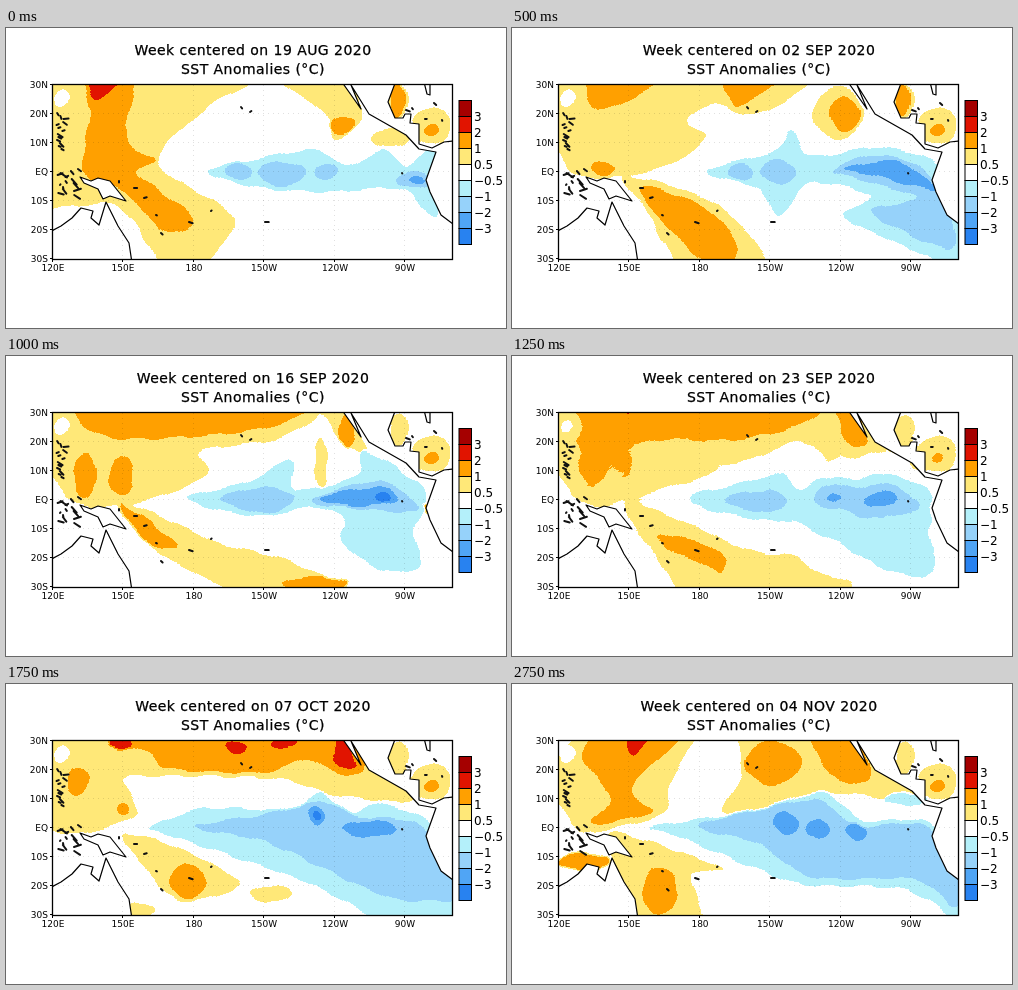
An HTML page with a canvas that plays this animation: 500x300 px, repeating every 3.75 s.

```html
<!DOCTYPE html>
<html lang="en">
<head>
<meta charset="utf-8">
<title>SST Anomalies</title>
<style>
html, body { margin: 0; width: 100%; height: 100%; overflow: hidden; background: #fff; }
canvas, svg { position: absolute; left: 0; top: 0; }
#map { left: 47px; top: 57px; }
text { font-family: "DejaVu Sans", sans-serif; font-size: 9px; }
.title { font-size: 14px; letter-spacing: .45px; text-anchor: middle; stroke: #000; stroke-width: .25px; }
.scale { font-size: 12px; }
.grid { stroke: #000; stroke-opacity: .12; stroke-dasharray: 1 4; }
.land { fill: #fff; stroke: #000; stroke-width: 1.2; stroke-linejoin: round; }
.isle { fill: none; stroke: #111; stroke-width: 2; stroke-linecap: round; }
</style>
</head>
<body>
<canvas id="map" width="399" height="174"></canvas>
<svg id="chart" width="500" height="300" viewBox="0 0 500 300">
  <defs><clipPath id="frame"><path d="M47 57H446V231H47Z"/></clipPath></defs>
  <text class="title" id="week" x="247" y="27"></text>
  <text class="title" x="247" y="46">SST Anomalies (°C)</text>
  <g clip-path="url(#frame)">
    <path class="land" d="M40 206L55 198 66 190 75 180 87 183 85 190 93 197 100 174 112 198 123 215 126 235H40Z"/>
    <path class="land" d="M74 149L85 153 92 150 104 153 120 173 104 168 97 171 92 161 78 155Z"/>
    <path class="land" d="M338 50V57L355 81 345 57 363 86 400 107 413 121 430 124 420 152 424 164 435 187 447 196V113L438 114 426 120 413 116V96L404 95 405 86 399 86 397 90 389 90 382 74 391 50Z"/>
    <path class="land" d="M417 50L421 66 424 67V50Z"/>
    <path class="isle" id="isles"/>
  </g>
</svg>
<script>
const LEFT = 47, TOP = 57, RIGHT = 446, BOTTOM = 231, STEP = 250, LOOP = 3750, WEEKS = 12;
const COLORS = ['#2882f0', '#50a5f5', '#96d2fa', '#b4f0fa', '#ffffff', '#ffe878', '#ffa000', '#e11400', '#a50000'];
const LEVELS = { deep: -4, blue: -3, sky: -2, cyan: -1, white: 0, yellow: 1, orange: 2, red: 3 };

// Outlines are smooth closed curves; four numbers mean an ellipse. Painted in order.
const CARIBBEAN = { yellow: '425 98 20 18 / 393 74 9 17', orange: '426 103 8 6' };
const fields = {};

fields[0] = {
  yellow: '66 57 248 57 203 78 152 135 228 190 188 231 160 231 112 178 47 175 47 86 / 266 57 340 57 355 92 330 111 318 84 / 384 110 20 9',
  orange: '80 57 128 57 120 110 149 133 131 145 188 190 160 204 116 162 78 145 84 85 / 336 97 13 9 / 391 73 8 19',
  red: '82 57 121 57 92 73',
  cyan: '200 143 240 133 308 122 342 138 378 122 400 138 428 122 430 190 395 161 320 164 248 159',
  sky: '233 143 14 8 / 276 146 24 12 / 321 143 12 8 / 408 152 17 8',
  blue: '411 153 7 4'
};
fields[2] = {
  yellow: '68 57 296 57 246 86 200 76 174 92 193 109 150 140 65 147 47 84 / 110 149 160 158 215 184 258 231 175 231 132 178 / 326 85 25 26',
  orange: '78 57 160 57 88 82 / 213 57 273 57 225 78 / 128 158 190 178 225 215 205 231 148 191 / 333 86 15 17 / 390 72 8 18 / 91 140 11 7',
  cyan: '193 143 262 123 280 103 300 128 368 119 428 138 446 198 446 231 385 215 330 187 360 168 300 155 267 187 245 160',
  sky: '229 144 13 8 / 266 144 17 12 / 322 142 360 127 410 140 440 190 435 221 358 184 405 170 335 148',
  blue: '332 141 385 133 424 162 360 147'
};
fields[4] = {
  yellow: '47 57 305 57 276 81 196 95 200 121 125 148 62 141 / 110 145 165 165 215 188 280 204 356 231 255 231 155 198 / 312 57 340 57 360 92 403 120 340 89 / 315 108 6 26',
  orange: '78 57 302 57 255 73 106 82 / 79 120 11 23 / 115 120 12 20 / 114 148 147 168 172 192 140 186 / 341 74 8 17 / 310 228 33 7',
  cyan: '180 143 240 126 285 104 290 134 350 120 360 95 420 136 408 175 415 210 375 214 335 185 340 165 310 151 250 160',
  sky: '213 143 256 131 288 140 262 158 / 308 142 375 125 412 155 325 150',
  blue: '314 141 374 131 391 145 345 150',
  deep: '376 142 8 5',
  red: '421 152 3 4'
};
fields[6] = {
  yellow: '47 57 346 57 412 116 335 108 285 92 235 112 120 127 95 150 60 135 / 118 150 175 165 245 198 290 202 306 231 175 231 140 205',
  orange: '74 57 340 57 366 95 285 78 226 92 150 84 115 105 84 125 66 110 / 150 186 185 177 222 204 195 231 165 212 / 269 208 18 8',
  red: '105 57 131 57 116 69 / 330 57 342 57 354 88 338 86',
  cyan: '147 145 200 132 256 120 287 137 310 118 346 132 365 119 425 142 446 198 446 231 400 225 340 199 275 172 200 157',
  sky: '188 143 262 138 256 160 / 282 154 325 119 350 142 364 130 411 150 376 167 394 184 345 187',
  blue: '318 135 12 13 / 366 147 15 8',
  deep: '317 134 6 5'
};
fields[7] = {
  yellow: '47 57 346 57 408 114 325 110 275 95 165 92 118 95 130 130 68 150 47 130 / 118 150 175 165 234 200 175 217 140 185 / 134 226 14 7 / 265 210 20 8',
  orange: '90 57 336 57 357 86 335 90 300 75 258 88 165 85 145 70 / 72 97 11 14 / 118 126 6 6 / 182 197 18 17',
  red: '115 59 12 6 / 230 63 10 6 / 278 59 14 5 / 335 57 350 82 328 77',
  cyan: '145 144 200 124 285 126 315 109 345 130 370 119 426 140 446 198 446 231 390 231 300 198 165 152',
  sky: '187 143 255 131 318 118 350 132 414 141 446 200 446 215 395 216 350 200 260 158',
  blue: '310 132 8 9 / 364 145 27 8',
  deep: '310 132 4 4'
};
fields[9] = {
  cyan: '140 143 212 123 304 117 345 131 410 129 446 198 446 231 385 231 310 202 260 172 180 155',
  sky: '192 141 255 128 345 132 380 154 414 141 446 200 440 222 335 202 304 180 314 169 270 155',
  blue: '292 145 14 8 / 328 140 8 7 / 405 184 9 6',
  white: '372 139 15 9',
  yellow: '58 57 340 57 370 95 330 111 260 92 235 104 190 82 100 92 145 125 95 152 47 122 / 118 150 195 178 315 214 255 231 185 200 150 202 / 372 139 9 6',
  orange: '104 69 132 57 206 57 130 80 / 73 90 10 20 / 228 70 255 57 336 57 365 101 285 74 235 83 / 108 134 26 13 / 155 183 14 20 / 265 213 20 10 / 372 139 6 4',
  red: '317 68 350 88 335 88'
};
fields[11] = {
  yellow: '47 88 84 57 180 57 158 100 150 130 80 148 64 143 / 235 57 345 57 410 117 325 109 215 129 230 90 / 112 150 212 185 180 190 190 231 130 231 95 160',
  orange: '70 70 96 57 171 57 119 105 140 127 80 140 98 114 / 261 79 28 22 / 298 57 341 57 358 96 320 92 / 148 207 17 24 / 72 178 25 9',
  red: '118 57 146 57 120 71',
  cyan: '140 143 235 128 310 108 350 136 418 139 446 198 446 231 395 206 295 201 245 185 165 152 / 394 115 23 6',
  sky: '185 142 270 120 310 117 345 142 414 142 446 205 440 222 405 196 300 193 245 159',
  blue: '274 139 12 11 / 306 145 13 9 / 344 148 10 8'
};

const makeContext = () => Object.assign(document.createElement('canvas'), { width: 500, height: 300 })
  .getContext('2d', { willReadFrequently: true });
const layer = makeContext(), blend = makeContext();
const map = document.getElementById('map').getContext('2d');

// Push points on the frame outwards so that blurring leaves no seam.
const bleed = (v, low, high) => v <= low ? v - 12 : v >= high ? v + 12 : v;

function trace(ctx, outline) {
  const n = outline.split(' ').map(Number);
  ctx.beginPath();
  if (n.length === 4) return ctx.ellipse(...n, 0, 0, Math.PI * 2);
  const pts = [];
  for (let i = 0; i < n.length; i += 2) pts.push([bleed(n[i], LEFT, RIGHT), bleed(n[i + 1], TOP, BOTTOM)]);
  const at = i => pts[(i + pts.length) % pts.length];
  ctx.moveTo(...at(0));
  pts.forEach((p, i) => {
    const a = at(i - 1), q = at(i + 1), b = at(i + 2);
    ctx.bezierCurveTo(p[0] + (q[0] - a[0]) / 7, p[1] + (q[1] - a[1]) / 7,
      q[0] - (b[0] - p[0]) / 7, q[1] - (b[1] - p[1]) / 7, ...q);
  });
}

function paint(field) {
  for (const [name, outlines] of Object.entries(field)) {
    layer.fillStyle = `rgb(${Array(3).fill(128 + LEVELS[name] * 24)})`;
    for (const outline of outlines.split(' / ')) {
      trace(layer, outline);
      layer.fill();
    }
  }
}

function drawField(field) {
  layer.fillStyle = 'rgb(128,128,128)';
  layer.fillRect(0, 0, 500, 300);
  paint(CARIBBEAN);
  paint(field);
  paint({ white: '55 71 8 9' });
}

// Weeks between two known ones are the contoured mean of both fields.
function renderWeek(week) {
  const sources = fields[week] ? [fields[week]] : [fields[week - 1], fields[week + 1]];
  blend.filter = `blur(${sources.length > 1 ? 4 : 0.8}px)`;
  sources.forEach((field, i) => {
    drawField(field);
    blend.globalAlpha = 1 / (i + 1);
    blend.drawImage(layer.canvas, 0, 0);
  });
  const tones = blend.getImageData(0, 0, 500, 300).data;
  const image = map.createImageData(RIGHT - LEFT, BOTTOM - TOP);
  for (let i = 0; i < image.data.length; i += 4) {
    const x = LEFT + i / 4 % image.width, y = TOP + Math.floor(i / 4 / image.width);
    // A slight warp gives the contours their ripple.
    const sx = Math.round(x + 1.5 * Math.sin(y / 5 + x / 14)), sy = Math.round(y + 1.5 * Math.sin(x / 6 + y / 17));
    const level = Math.round((tones[(sy * 500 + sx) * 4] - 128) / 24);
    const color = parseInt(COLORS[level + 4].slice(1), 16);
    image.data.set([color >> 16, color >> 8 & 255, color & 255, 255], i);
  }
  return image;
}

function weekTitle(week) {
  const d = new Date(Date.UTC(2020, 7, 19 + week * 7));
  const month = ['AUG', 'SEP', 'OCT', 'NOV'][d.getUTCMonth() - 7];
  return `Week centered on ${String(d.getUTCDate()).padStart(2, '0')} ${month} 2020`;
}

function drawIsles() {
  let seed = 5;
  const random = () => (seed = seed * 16807 % 2147483647) / 2147483647;
  const dash = (x, y, size) =>
    `M${x} ${y}l${(random() * size).toFixed(1)} ${((random() - .3) * size).toFixed(1)}`;
  const places = '113 153 128 160 138 170 150 187 155 205 183 194 205 183 235 79 244 84 259 194 396 145 400 82 406 80 419 91 436 92 428 75';
  let d = places.match(/\d+ \d+/g).map(p => dash(...p.split(' '), 4)).join('');
  for (let i = 0; i < 13; i++) d += dash(48 + random() * 10, 85 + i * 3, 6);
  for (let i = 0; i < 14; i++) d += dash(48 + random() * 26, 141 + i * 2, 8);
  document.getElementById('isles').setAttribute('d', d);
}

function drawAxes() {
  let out = '';
  const label = (x, y, text, anchor, cls = '') =>
    out += `<text class="${cls}" x="${x}" y="${y}" text-anchor="${anchor}">${text}</text>`;
  const line = (d, cls = '') => out += `<path class="${cls}" d="${d}" fill="none" ${cls ? '' : 'stroke="#000"'}/>`;
  ['30N', '20N', '10N', 'EQ', '10S', '20S', '30S'].forEach((text, i) => {
    const y = TOP + i * 29;
    label(42, y + 3, text, 'end');
    line(`M44 ${y - .5}H47`);
    if (i % 6) line(`M47 ${y - .5}H446`, 'grid');
  });
  ['120E', '150E', '180', '150W', '120W', '90W'].forEach((text, i) => {
    const x = Math.round(LEFT + i * 70.4);
    label(x, 243, text, 'middle');
    line(`M${x - .5} 231V234`);
    if (i) line(`M${x - .5} 57V231`, 'grid');
  });
  out += '<rect x="46.5" y="56.5" width="400" height="175" fill="none" stroke="#000" stroke-width="1.3"/>';
  [...COLORS].reverse().forEach((color, i) =>
    out += `<rect x="453" y="${72.5 + i * 16}" width="12.5" height="16" fill="${color}" stroke="#000"/>`);
  ['3', '2', '1', '0.5', '−0.5', '−1', '−2', '−3'].forEach((text, i) =>
    label(468, 92.5 + i * 16, text, 'start', 'scale'));
  document.getElementById('chart').insertAdjacentHTML('beforeend', out);
}

drawIsles();
drawAxes();
const weeks = Array.from({ length: WEEKS }, (_, i) => renderWeek(i));
const title = document.getElementById('week');
let shown = -1, start;

function tick(now) {
  start ??= now;
  const week = Math.min(WEEKS - 1, Math.floor((now - start) % LOOP / STEP));
  if (week !== shown) {
    shown = week;
    map.putImageData(weeks[week], 0, 0);
    title.textContent = weekTitle(week);
  }
  requestAnimationFrame(tick);
}
tick(performance.now());
</script>
</body>
</html>
```
